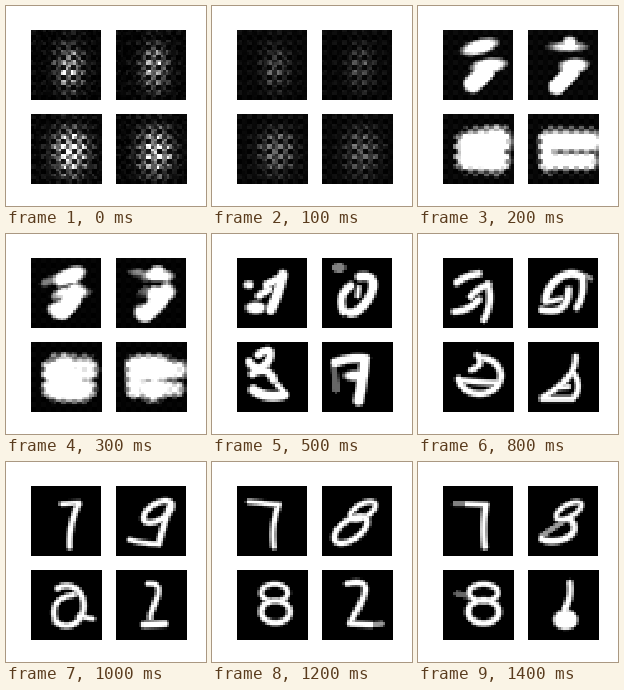
A matplotlib script that plays this animation: 200x200 px, repeating every 1500 ms.

```python
import numpy as np
import matplotlib.pyplot as plt
from matplotlib.animation import FuncAnimation

CELLS, PANEL, STEPS = 28, 70, 15
axis = (np.arange(CELLS) + 0.5) * PANEL / CELLS
X, Y = np.meshgrid(axis, axis)
rng = np.random.default_rng(7)

# Coarse checker left by strided upsampling
CHECK = np.tile(np.kron([[1, 0.4], [0.08, 0.55]], np.ones((2, 2))), (7, 7))


def dim(field, level):
    """Cap a field so that it renders no brighter than level."""
    return np.minimum(field, (level - 0.5) * 3) if level < 1 else field


def brush(radius, x, y):
    gaps = np.hypot(X[..., None] - x, Y[..., None] - y)
    return radius - gaps.min(axis=-1)


def curve(radius, *points, level=1):
    """Smooth brush line through two to four points."""
    points = np.array(points, float)
    steps = np.hypot(*np.diff(points, axis=0).T)
    t = np.append(0, np.cumsum(steps)) / steps.sum()
    coef = np.polyfit(t, points, len(points) - 1)
    x, y = (np.vander(np.linspace(0, 1, 50), len(points)) @ coef).T
    return dim(brush(radius, x, y), level)


def arc(radius, cx, cy, a, b, tilt=0, start=0, end=360):
    """Brush line along an ellipse."""
    t, turn = np.radians(np.linspace(start, end, 90)), np.radians(tilt)
    z = (a * np.cos(t) + 1j * b * np.sin(t)) * np.exp(1j * turn)
    return brush(radius, cx + z.real, cy + z.imag)


def blob(cx, cy, a, b, tilt=0, level=1):
    """Filled ellipse."""
    z = (X - cx + 1j * (Y - cy)) * np.exp(-1j * np.radians(tilt))
    return dim((1 - np.hypot(z.real / a, z.imag / b)) * min(a, b), level)


def glyph(*parts):
    return np.clip(np.max(parts, axis=0), -9, 7)


def checks(width, gain):
    env = gain * np.exp(-((X - 39) / width) ** 2 / 2 - ((Y - 38) / 15) ** 2 / 2)
    noise = rng.random(X.shape)
    return np.clip((env * (0.5 + 0.8 * noise) + 0.1 * noise) * CHECK, 0, 1)


START = [checks(9, 1), checks(9, 0.95), checks(11, 1.6), checks(11, 1.3)]

# Four panels at each settled step; the steps between are morphs
KEYS = {
    2: (
        glyph(blob(37, 17, 18, 7, -15), blob(46, 36, 17, 7, -8),
              curve(9, (43, 42), (30, 54))),
        glyph(blob(40, 17, 17, 4), blob(42, 13, 7, 6), blob(46, 36, 14, 7, -5),
              curve(8, (44, 42), (29, 57))),
        glyph(curve(15, (28, 32), (53, 28)), curve(13, (26, 44), (53, 46))),
        glyph(curve(8, (19, 25), (20, 50)), curve(11, (24, 27), (62, 28)),
              curve(9, (26, 47), (60, 47))),
    ),
    5: (
        glyph(curve(5, (46, 17), (42, 32), (34, 52)), curve(4, (30, 27), (46, 19)),
              curve(3.5, (22, 38), (32, 32)), blob(19, 50, 10, 6), blob(12, 27, 5, 4)),
        glyph(curve(4.5, (38, 19), (50, 22), (46, 42), (28, 55)),
              curve(4, (29, 28), (20, 40), (22, 54)), curve(2.5, (37, 30), (36, 38)),
              blob(17, 10, 6, 4, level=0.5)),
        glyph(curve(4, (21, 13), (33, 11), (31, 19), (12, 20)),
              curve(4, (15, 32), (30, 30), (36, 38)),
              curve(5, (16, 48), (30, 54), (46, 53)), curve(3, (47, 52), (40, 43))),
        glyph(curve(4.5, (13, 21), (28, 17), (43, 17)),
              curve(5, (42, 20), (39, 42), (36, 59)), blob(33, 34, 11, 5),
              curve(2.5, (12, 26), (14, 48), level=0.4)),
    ),
    8: (
        glyph(curve(3.5, (14, 25), (24, 19), (36, 16)),
              curve(3.3, (46, 27), (34, 33), (28, 39)),
              curve(3.3, (45, 26), (47, 42), (41, 62)),
              curve(3.5, (12, 54), (26, 50), (36, 42))),
        glyph(curve(4, (18, 43), (28, 23), (44, 16), (55, 20)),
              curve(3.3, (55, 22), (54, 38), (49, 50)),
              curve(3.5, (14, 52), (34, 50), (41, 32)),
              curve(2.5, (20, 44), (34, 41)),
              curve(2, (56, 17), (63, 21), level=0.6)),
        glyph(arc(3.3, 36, 34, 21, 18, start=-80, end=170),
              curve(3, (34, 13), (36, 22), (28, 28)),
              curve(3, (16, 38), (32, 40), (52, 41))),
        glyph(curve(3, (47, 15), (43, 30), (30, 45), (14, 56)),
              curve(3, (45, 32), (49, 48), (44, 57)), curve(3, (14, 57), (44, 57)),
              curve(2.5, (28, 46), (40, 45))),
    ),
    10: (
        glyph(curve(2.4, (31, 18), (48, 17)), curve(3, (48, 18), (41, 38), (39, 61))),
        glyph(arc(3, 42, 26, 16, 8, -32), curve(3.2, (55, 17), (48, 40), (43, 58)),
              curve(2.6, (14, 54), (28, 57), (43, 58))),
        glyph(arc(3, 35, 36, 17, 20, start=-120, end=130),
              curve(2.8, (24, 50), (24, 36), (42, 25)), curve(2.5, (47, 46), (61, 49))),
        glyph(curve(2.7, (32, 14), (41, 17), (39, 32), (34, 48)),
              curve(3.5, (28, 55), (48, 54))),
    ),
    12: (
        glyph(curve(2.5, (12, 16), (42, 19)), curve(2.8, (42, 19), (37, 38), (37, 61))),
        glyph(arc(2.7, 41, 25, 14, 6.5, -30), arc(3, 29, 44, 19, 9.5, -35)),
        glyph(arc(2.6, 37, 23, 13, 8.5), arc(3, 38, 42, 14, 11)),
        glyph(curve(3, (25, 14), (42, 17), (38, 34), (28, 53)),
              curve(3, (28, 54), (48, 55)), curve(2.2, (48, 55), (59, 54), level=0.6)),
    ),
    14: (
        glyph(curve(2, (12, 18), (24, 18), level=0.5), curve(2.6, (24, 18), (44, 19)),
              curve(3.2, (43, 20), (41, 40), (42, 61))),
        glyph(arc(2.6, 41, 25, 14, 6, -30),
              curve(3.3, (42, 33), (46, 45), (30, 55), (14, 53)),
              curve(2.2, (14, 50), (38, 34), level=0.6)),
        glyph(arc(2.8, 40, 23, 14, 8.5), arc(3.2, 40, 42, 15, 11.5),
              curve(2.2, (14, 24), (24, 26), level=0.4)),
        glyph(curve(3, (41, 13), (41, 26), (36, 40)), blob(37, 50, 12, 10)),
    ),
}


def render(step, panel):
    if step == 0:
        return START[panel]
    lo = max((k for k in KEYS if k <= step), default=2)
    hi = min(k for k in KEYS if k >= step)
    t = (step - lo) / max(hi - lo, 1)
    field = (1 - t) * KEYS[lo][panel] + t * KEYS[hi][panel] + 6 * t * (1 - t)
    # Early steps are blurrier, mostly in the lower row
    early = np.clip((4 - step) / 2, 0, 1)
    rough = early * (1 if panel > 1 else 0.1)
    image = 0.5 + (field + 4 * rough * (CHECK - 0.5)) / (3 + 5 * rough)
    image = np.clip(image, 0.05 * early * CHECK, 1)
    return image if step > 1 else np.clip(0.4 * START[panel] + 0.75 * image, 0, 1)


fig, axes = plt.subplots(2, 2, figsize=(2, 2), dpi=100)
images = []
for panel, ax in enumerate(axes.flat):
    images.append(ax.imshow(START[panel], cmap="gray", vmin=0, vmax=1,
                            interpolation="nearest"))
    ax.axis("off")


def draw(step):
    for panel, image in enumerate(images):
        image.set_data(render(step, panel))
    return images


anim = FuncAnimation(fig, draw, frames=STEPS, interval=100, repeat=True, repeat_delay=0)
plt.show()
```
